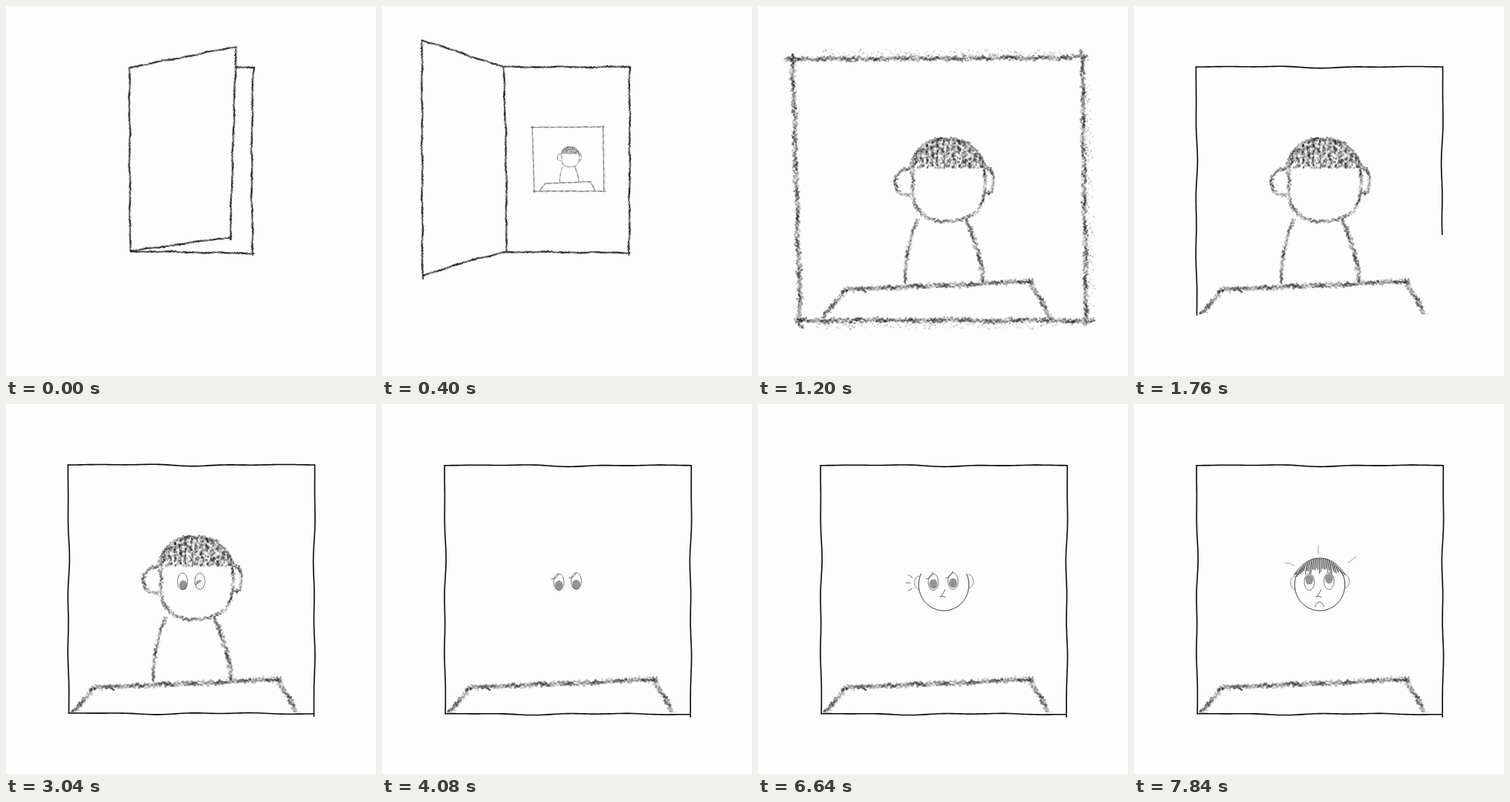
These frames come from a looping animation (480x480 px, 8 s). An HTML page with a canvas:

```html
<!DOCTYPE html>
<html>
<head>
<meta charset="utf-8">
<style>
html, body { margin: 0; width: 100%; height: 100%; overflow: hidden; background: #fdfdfd; }
canvas { display: block; }
</style>
</head>
<body>
<canvas id="c" width="480" height="480"></canvas>
<script>
const ctx = document.getElementById('c').getContext('2d');
const PAPER = '#fdfdfd', LOOP = 8000, STEP = 80;
const BEAT = { glance: 4960, nose: 5680, blink: 5840, face: 6080, ear: 6480, ear2: 6640, mouth: 6800, lookUp: 7040, hair: 7840 };

const clamp = v => Math.max(0, Math.min(1, v));
const mix = (a, b, u) => a + (b - a) * u;
const between = (a, b, u) => [mix(a[0], b[0], u), mix(a[1], b[1], u)];
// progress over n steps, the first change being visible at start
const steps = (t, start, n) => clamp((t - start + STEP) / (n * STEP));

function random(seed) {
  let s = seed * 7919 + 17;
  return () => {
    s = (s + 0x6D2B79F5) | 0;
    let r = Math.imul(s ^ (s >>> 15), 1 | s);
    r = (r + Math.imul(r ^ (r >>> 7), 61 | r)) ^ r;
    return ((r ^ (r >>> 14)) >>> 0) / 4294967296;
  };
}

const points = (n, f) => Array.from({ length: n + 1 }, (_, i) => f(i / n));

// part of an ellipse; power below 1 makes it squarer
function arc(cx, cy, rx, ry, from, to, power = 1) {
  const bend = v => Math.sign(v) * Math.abs(v) ** power;
  return points(40, u => {
    const a = mix(from, to, u) * Math.PI / 180;
    return [cx + rx * bend(Math.cos(a)), cy + ry * bend(Math.sin(a))];
  });
}

// line from a to b, offset sideways by shape(u)
function bent(a, b, shape, n = 12) {
  const dx = b[0] - a[0], dy = b[1] - a[1], len = Math.hypot(dx, dy);
  return points(n, u => {
    const [x, y] = between(a, b, u), off = shape(u);
    return [x - dy / len * off, y + dx / len * off];
  });
}
const bow = (a, b, h) => bent(a, b, u => 4 * h * u * (1 - u));
const shaky = (a, b, seed) => bent(a, b, u => Math.sin(Math.PI * u) * (Math.sin(u * 9 + seed) + 0.7 * Math.sin(u * 23 + seed * 3)), 60);

const lengthOf = p => p.reduce((s, q, i) => i ? s + Math.hypot(q[0] - p[i - 1][0], q[1] - p[i - 1][1]) : 0, 0);

// grainy stroke; the part before "erased" is left out
function chalk(p, o, seed, erased = 0) {
  const rnd = random(seed), total = lengthOf(p);
  let done = 0;
  ctx.fillStyle = '#1a1a1a';
  for (let i = 1; i < p.length; i++) {
    const [x, y] = p[i - 1], dx = p[i][0] - x, dy = p[i][1] - y, len = Math.hypot(dx, dy) || 1;
    const count = Math.max(1, Math.round(len * o.density));
    for (let k = 0; k < count; k++) {
      const u = (k + rnd()) / count, d = done + u * len;
      const wave = o.wave * (Math.sin(d * o.freq + seed) + 0.6 * Math.sin(d * o.freq * 2.3 + seed * 2));
      const off = wave + (rnd() + rnd() - 1) * o.width;
      const size = o.grain * (0.6 + rnd() * 0.8);
      const patch = 0.75 + 0.25 * Math.sin(d * o.freq * 3 + seed * 5);
      const alpha = o.alpha * patch * (0.6 + rnd() * 0.4);
      if (d < erased * total) continue;
      ctx.globalAlpha = alpha;
      ctx.fillRect(x + dx * u - dy / len * off - size / 2, y + dy * u + dx / len * off - size / 2, size, size);
    }
    done += len;
  }
  ctx.globalAlpha = 1;
}

const EDGE = { width: 1.5, density: 6.5, grain: 0.9, alpha: 0.85, wave: 0.45, freq: 0.09 };
const SOFT = { width: 4, density: 1.9, grain: 2.3, alpha: 0.48, wave: 0.5, freq: 0.06 };
const THIN = { ...SOFT, width: 3, density: 1.8, grain: 2, alpha: 0.45 };
const FAINT = { ...SOFT, width: 8, density: 0.6, grain: 1.8, alpha: 0.3 };

function roughFrame(erased) {
  const corners = [[45, 69], [421, 67], [426, 408], [55, 408]];
  corners.forEach((a, i) => {
    const b = corners[(i + 1) % 4], e = clamp(erased * 4 - i);
    chalk([between(a, b, -0.03), between(a, b, 1.02)], SOFT, i + 1, e);
    if (i < 3) chalk(bent(between(a, b, 0.1), between(a, b, 0.95), () => -5), FAINT, i + 5, e);
  });
}

function desk() {
  chalk([[84, 406], [115, 367]], SOFT, 11);
  chalk([[113, 368], [357, 357]], SOFT, 12);
  chalk([[353, 356], [380, 406]], SOFT, 13);
}

function darkHair(erased) {
  const rnd = random(31);
  ctx.fillStyle = '#222';
  for (let i = 0; i < 950; i++) {
    const u = rnd() * 2 - 1, x = 245 + 45 * u, y = 171 + 38 * rnd();
    const alpha = (0.25 + 0.35 * rnd()) * (0.65 + 0.35 * Math.sin(x * 0.9));
    if (y < 209 - 38 * Math.sqrt(1 - u * u) || (u + 1) / 2 < erased) continue;
    ctx.globalAlpha = alpha;
    ctx.fillRect(x, y, 2.2, 2.8);
  }
  ctx.globalAlpha = 1;
}

function person(erased, earErased) {
  const e = k => clamp(erased * 4 - k);
  darkHair(e(0));
  chalk(arc(246, 210, 47, 38, 180, 360), THIN, 21, e(0));
  chalk(arc(247, 228, 47, 51, 205, -25, 0.75), THIN, 22, e(1));
  chalk(arc(195, 228, 17, 17, 280, 80), THIN, 23, e(2));
  chalk(arc(296, 228, 10, 17, -90, 90), THIN, 24, earErased);
  chalk(bow([208, 276], [190, 360], 4), THIN, 25, e(3));
  chalk(bow([271, 277], [292, 358], -3), SOFT, 26, e(3));
}

function card(t) {
  const open = steps(t, 80, 6), angle = mix(28, 165, open) * Math.PI / 180;
  const nearX = 8 + 146 * Math.cos(angle);
  const topY = -62 * Math.sin(angle), lowY = mix(-18, 17, open) + 40 * Math.sin(Math.PI * open);
  const near = clamp((t - 960) / 240);
  const s = 1 + 0.69 * clamp((t - 720) / 240) ** 1.5 + 2.407 * near;
  const cx = mix(247, 243.5, near), cy = mix(197, 186, near);

  ctx.save();
  ctx.translate(cx, cy);
  ctx.scale(s, s);
  ctx.translate(-cx, -cy);

  const hinge = [160 - 3 * open, 80 - open], foot = [161, 318 + open];
  chalk([hinge, [322, 80 - open]], EDGE, 42);
  chalk(bow([321, 79], [320.5, 324], 2 - 3 * open), EDGE, 43);
  chalk([foot, [322, 321 - open]], EDGE, 44);

  ctx.save();
  ctx.scale(1 / 4.097, 1 / 4.097);
  ctx.translate(754, 576);
  roughFrame(0);
  desk();
  person(0, 0);
  ctx.restore();

  const top = [hinge[0] + nearX + 1.5, 80 + topY + 2];
  const low = [foot[0] + nearX - 7 * (1 - open), foot[1] + lowY];
  ctx.fillStyle = PAPER;
  ctx.beginPath();
  [hinge, top, low, foot].forEach(p => ctx.lineTo(...p));
  ctx.fill();
  chalk([hinge, top], EDGE, 45);
  chalk([top, between(top, low, 1.015)], EDGE, 46);
  chalk(bow(foot, low, 2 * open), EDGE, 47);
  chalk(bow(hinge, foot, -2 * open), EDGE, 41);
  ctx.restore();
}

// thin ink line, drawn up to "part" of its length
function ink(p, width = 0.8, color = '#444', part = 1) {
  let left = lengthOf(p) * part;
  if (left <= 0) return;
  ctx.strokeStyle = color;
  ctx.lineWidth = width;
  ctx.lineCap = ctx.lineJoin = 'round';
  ctx.beginPath();
  ctx.moveTo(...p[0]);
  for (let i = 1; i < p.length && left > 0; i++) {
    const q = p[i - 1], len = Math.hypot(p[i][0] - q[0], p[i][1] - q[1]) || 1;
    ctx.lineTo(...between(q, p[i], Math.min(1, left / len)));
    left -= len;
  }
  ctx.stroke();
}

function inkFrame(part, shift) {
  const [tl, tr, br, bl] = [[80.5, 79], [400.5, 79], [399.5, 402], [81.5, 401]].map(([x, y]) => [x + shift, y + shift]);
  [[bl, tl], [tl, tr], [tr, between(tr, br, 1.01)], [br, bl]].forEach(([a, b], i) =>
    ink(shaky(a, b, i + 2), 1.6, '#0c0c0c', clamp(part * 4 - i)));
}

// short strokes fanning out from a point, angles in degrees
function rays(x, y, r, len, middle, spread, width = 0.8) {
  for (let k = -1; k <= 1; k++) {
    const a = (middle + k * spread) * Math.PI / 180, c = Math.cos(a), s = Math.sin(a);
    ink([[x + c * r, y + s * r], [x + c * (r + len), y + s * (r + len)]], width);
  }
}

function pupil(x, y, rx, ry, part) {
  if (part <= 0) return;
  ctx.save();
  ctx.beginPath();
  ctx.ellipse(x, y, rx, ry, 0, 0, 7);
  ctx.clip();
  ctx.fillStyle = `rgba(80,80,80,${0.15 * part})`;
  ctx.fill();
  for (let d = -10; d < -10 + 20 * part; d += 2.1) ink([[x - 7, y + 5 + d], [x + 7, y - 5 + d]], 0.95, '#333');
  ctx.restore();
}

function eye(x, y, dx, dy, outline = 1, fill = 1) {
  ink(arc(x, y, 6.5, 10.7, -150, 210), 0.8, '#555', outline);
  pupil(x + dx, y + dy, 5.1, 6.3, fill);
}

function eyes(t) {
  if (t < 3520) {
    eye(229, 230, 1, 5, steps(t, 2000, 4), steps(t, 2320, 3));
    eye(251.5, 230, -0.5, 4.5, steps(t, 2640, 5), steps(t, 2960, 6));
    return;
  }
  const beat = Object.values(BEAT).filter(b => t >= b).length;
  const up = t >= BEAT.lookUp;
  const dx = beat && !up ? 1.5 * Math.sin(beat * Math.PI / 2) : 0;
  const dy = up ? -3.2 : beat ? 1 + 1.5 * Math.cos(beat * Math.PI) : 4.4;
  const drift = beat ? 1 : 0;
  [[229.5 - 2 * drift, 231], [252 + drift, 229.8]].forEach(([x, y]) => {
    eye(x, y, dx, dy);
    if (!up) ink(bow([x - 9.5, y - 4], [x - 0.5, y - 10.7 - 2 * drift], 2));
  });
}

function newHair() {
  const rnd = random(5);
  const cap = u => 200 + 21 * Math.abs(u) ** 2.2;
  ink(points(24, u => [mix(208, 274, u), cap(u * 2 - 1)]), 0.9, '#333');
  for (let u = -0.95; u < 0.96; u += 0.052) {
    const x = 241 + 33 * u, low = 213 + 6 * u * u + rnd() * 7;
    ink([[x - 2 * u, cap(u) + 0.5], [x + 2 * u, Math.max(cap(u) + 3, low)]], 0.85, '#333');
  }
  ink(bow([196, 206], [208, 210], -1), 0.8, '#888');
  ink([[239, 184], [239, 194]], 0.8, '#888');
  ink([[277.5, 206], [288.5, 198]], 0.8, '#888');
}

function newFace(t) {
  const after = b => t >= BEAT[b], during = (a, b) => after(a) && !after(b);
  if (after('nose')) {
    ink(bow([242.5, 241], [236.5, 250], -0.6), 0.9);
    ink(bow([236.5, 250], [243, 251], -1.2), 0.9);
  }
  if (during('nose', 'face')) rays(238, 242, 12, 6.5, 146, 32, 1.2);
  if (after('face')) ink(arc(241, 234.5, 32.6, 33.6, 205, -25), 0.95, '#333', steps(t, BEAT.face, 5));
  if (after('ear')) ink(arc(274, 230, 5.3, 8.5, -100, 100), 0.8, '#666');
  if (during('ear', 'ear2')) rays(272, 230, 10, 5, 0, 35);
  if (after('ear2')) ink(arc(208.5, 232, 5.2, 8.5, 280, 80), 0.8, '#666');
  if (during('ear2', 'mouth')) rays(210, 232, 12, 6, 180, 35);
  if (after('mouth')) ink(arc(240.5, 263, 5.5, 6, 180, 360), 0.9);
  if (after('hair')) newHair();
}

function picture(t) {
  const gone = steps(t, 1280, 5), left = steps(t, 3520, 8);
  if (gone < 1) roughFrame(gone);
  ctx.save();
  ctx.beginPath();
  ctx.rect(80, 78, 320, gone < 1 ? 402 : 322);
  ctx.clip();
  desk();
  if (left < 1) person(left, steps(t, 3200, 4));
  ctx.restore();
  inkFrame(steps(t, 1680, 3), t < 3520 ? 0 : 0.7);
  eyes(t);
  newFace(t);
}

let shown = -1;
function draw(now) {
  const t = Math.floor(now % LOOP / STEP) * STEP;
  if (t !== shown) {
    shown = t;
    ctx.fillStyle = PAPER;
    ctx.fillRect(0, 0, 480, 480);
    if (t < 1280) card(t);
    else picture(t);
  }
  requestAnimationFrame(() => draw(performance.now() - start));
}
const start = performance.now();
draw(0);
</script>
</body>
</html>
```
